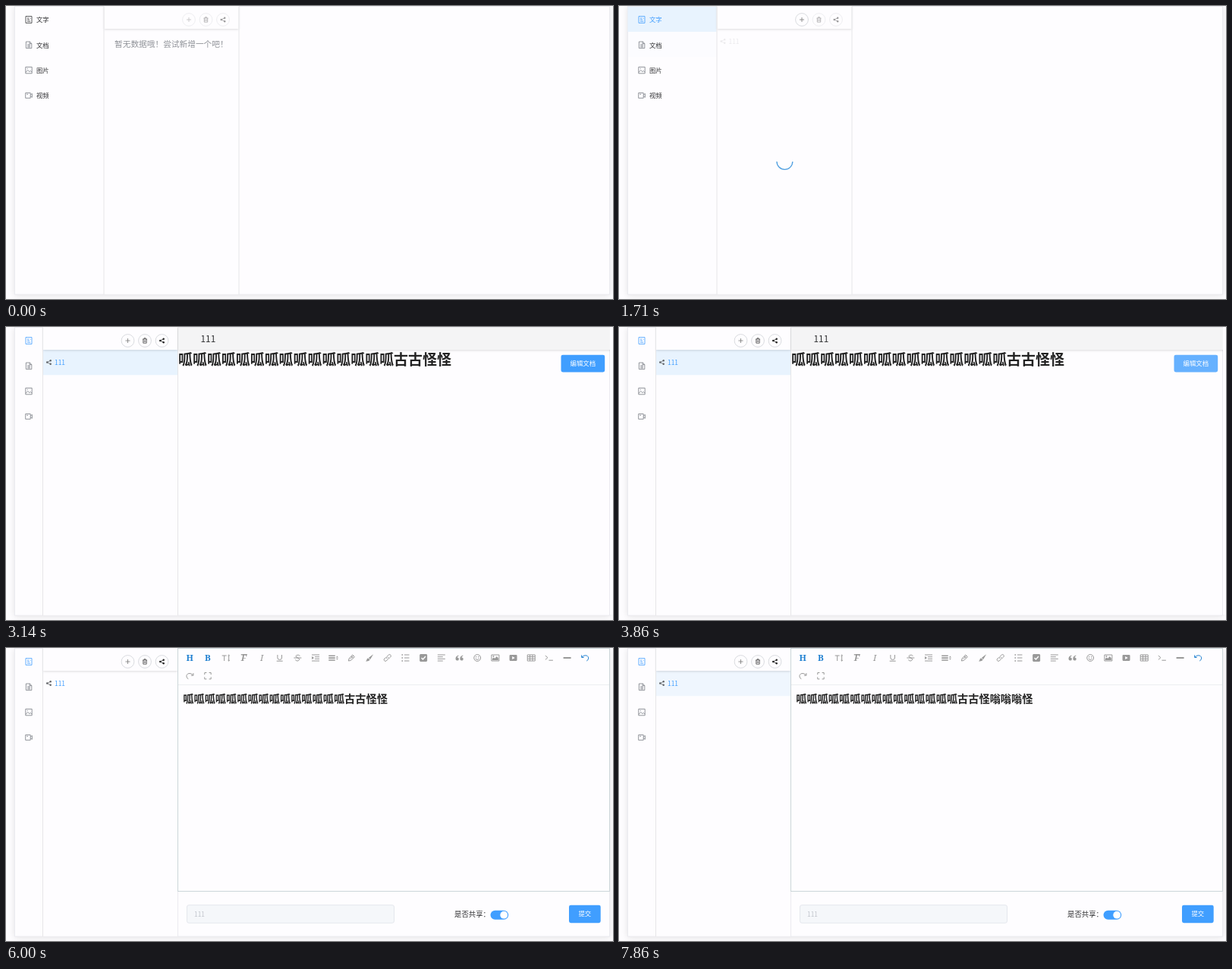
An HTML page for the animation above (8000 ms loop, 800 by 386 pixels).

```html
<!DOCTYPE html>
<html lang="zh">
<head>
<meta charset="utf-8">
<style>
html, body { margin: 0; width: 100%; height: 100%; overflow: hidden; background: #fefdff; }
svg { display: block; font-family: "Noto Sans CJK SC", "Noto Sans CJK", "Noto Sans", sans-serif; font-size: 8.4px; }
text { fill: currentColor; white-space: pre; }
path { fill: none; stroke: currentColor; stroke-width: 1; }
path.f { fill: currentColor; stroke: none; }
.thin path { stroke-width: .8; }
.line { stroke: #e6e6e8; }
.serif { font: bold 11.5px "Noto Serif", serif; text-anchor: middle; }
.mid { text-anchor: middle; }
.tools { color: #999; }
.on { color: #1e7fd0; }
.big { font-weight: bold; color: #222; }
.row { fill: #e8f3fe; }
</style>
</head>
<body>
<svg id="stage" width="800" height="386" viewBox="0 0 800 386"></svg>
<script>
const LOOP = 8000;
const BG = '#fefdff', BLUE = '#409eff';
const at = (x, y, body, attrs = '') => `<g transform="translate(${x} ${y})" ${attrs}>${body}</g>`;
const line = d => `<path d="${d}"/>`;
const solid = d => `<path class="f" d="${d}"/>`;
const glyph = (s, style = '') => `<text class="serif" y="4" style="${style}">${s}</text>`;
const rect = (x, y, w, h, attrs) => `<rect x="${x}" y="${y}" width="${w}" height="${h}" ${attrs}/>`;
const dot = (x, y, r) => `<circle cx="${x}" cy="${y}" r="${r}" fill="currentColor"/>`;
const label = (x, y, s, attrs = '') => `<text x="${x}" y="${y}" ${attrs}>${s}</text>`;

const share = line('M2.2-2.3L-2.3 0L2.2 2.3') + dot(2.2, -2.3, 1.2) + dot(-2.3, 0, 1.2) + dot(2.2, 2.3, 1.2);
const plus = line('M-3 0H3M0-3V3');
const trash = line('M-3-2H3M-1-2V-3.3H1V-2M-2.2-2V3.2H2.2V-2M-.8-.5V1.8M.8-.5V1.8');

const page = 'M-3.6-4.3H1.4L3.8-1.9V4.3H-3.6Z';
const menu = [
  ['文字', line('M-4-4.4H4V4.4H-4ZM-2-2H0M-2 0H1M-2 2.2H2.2M1.4-2.4L2.4-1.4')],
  ['文档', line(page + 'M1.2-4.3V-1.7H3.8M-1.8-.6H2M-1.8 1.1H2M-1.8 2.7H2')],
  ['图片', line('M-4.2-4.2H4.2V4.2H-4.2ZM-4 2.6L-1.2 0L1 2L2.4 .8L4 2.4M-2.2-2.2H-1.2')],
  ['视频', line('M-4.3-3.4H2.2V3.4H-4.3ZM2.2-1L4.4-2.4V2.4L2.2 1M-2.8-1.6H-.8')]
];

const bars = line('M-1.5-4H5M-1.5 0H5M-1.5 4H5');
const tools = [
  glyph('H'), glyph('B', 'font-family:"Noto Sans",sans-serif'),
  line('M-5-3H1M-2-3V4M4-3.5V4M2.8-2.8L4-4L5.2-2.8M2.8 3L4 4.2L5.2 3'),
  glyph('F', 'font-style:italic') + line('M-3-3.5Q-4-5-2-4.5H4.5'),
  glyph('I', 'font-style:italic;font-weight:400'),
  line('M-2.8-4V0Q-2.8 2.4 0 2.4T2.8 0V-4M-4 4.2H4'),
  line('M3-2.6Q1.5-4.4-1-3.6T-1.6-.8L1.6 .8Q3.2 2.2 1.2 3.6T-3 2.6M-5 0H5'),
  line('M-5-4H5M-1-1.3H5M-1 1.3H5M-5 4H5') + solid('M-5-2L-2 0L-5 2Z'),
  `<g stroke-width="2">${solid('M-6.5-3.6H2V-2H-6.5ZM-6.5-.7H2V.9H-6.5ZM-6.5 2.2H2V3.8H-6.5ZM3.2-.6L4.7-2.4L6.2-.6ZM3.2 .8L4.7 2.6L6.2 .8Z')}</g>`,
  line('M-4 4L-3.4 1L1.2-4L4-1.4L-1 3.4ZM-1.8 1.6L2.4-2.8M-.4-2.2L2.4 .4'),
  solid('M5-4.8L1 2L-1.2 0ZM-1.8 .4L.6 2.6Q-1 5-5 4.4Q-3.4 3-3.4 1.6Q-3 .4-1.8 .4Z'),
  line('M-.8 1Q-2-.4-.8-1.6L1.6-4Q3-5 4.2-3.6T3.8-1L2.2 .6M.8-1Q2 .4 .8 1.6L-1.6 4Q-3 5-4.2 3.6T-3.8 1L-2.2-.6'),
  bars + solid('M-5-4.7H-3.3V-3.2H-5ZM-5-.7H-3.3V.8H-5ZM-5 3.2H-3.3V4.7H-5Z'),
  solid('M-4-5H4L5-4V4L4 5H-4L-5 4V-4Z') + '<path d="M-2.6 0L-.7 2L2.8-2" style="stroke:#fff;stroke-width:1.4"/>',
  line('M-5-4H5M-5-1.3H2M-5 1.3H5M-5 4H2'),
  solid('M-1-3.6Q-5-2.6-5 1.2Q-5 3.6-2.8 3.6T-.6 1.4T-2.8-.6Q-2.6-2-1-2.6ZM4.8-3.6Q.8-2.6 .8 1.2Q.8 3.6 3 3.6T5.2 1.4T3-.6Q3.2-2 4.8-2.6Z'),
  '<circle r="4.4" fill="none" stroke="currentColor"/>' + dot(-1.6, -1.2, .8) + dot(1.6, -1.2, .8) + line('M-2.5 1Q0 4 2.5 1'),
  line('M-5-4H5V4H-5Z') + solid('M-4 3V1L-2-.6L-.6 .8L2-2L4 .4V3Z') + dot(-2.4, -2, .9),
  solid('M-4-4H4Q5-4 5-2.6V2.6Q5 4 4 4H-4Q-5 4-5 2.6V-2.6Q-5-4-4-4ZM-1.4-2V2L2.2 0Z'),
  line('M-5-4H5V4H-5ZM-5-1.4H5M-5 1.3H5M-1.7-4V4M1.7-4V4'),
  line('M-5-3L-2-.3L-5 2.4M-.5 3.2H5'),
  solid('M-5-1H5V1H-5Z'),
  line('M-4.6-3.6V-.6H-1.6M-4.4-.8Q-1.8-3.8 1.4-3.2Q5-2 4.2 1.4Q3.6 3.4 2 4'),
  line('M4.6-3.6V-.6H1.6M4.4-.8Q1.8-3.8-1.4-3.2Q-5-2-4.2 1.4Q-3.6 3.4-2 4'),
  line('M-4.2-1.6V-4.2H-1.6M1.6-4.2H4.2V-1.6M4.2 1.6V4.2H1.6M-1.6 4.2H-4.2V1.6')
];

const circleButton = (i, icon, color) => at(112 + 22.5 * i, 18,
  `<circle r="8.4" fill="${BG}" stroke="#d5d7dc" stroke-width=".9"/>` + icon, `class="thin" id="act${i}" color="${color}"`);
const button = (x, y, w, h, s, id) => `<g id="${id}" color="#fff">` +
  rect(x, y, w, h, `rx="2.4" fill="${BLUE}"`) + label(x + w / 2, y + h / 2 + 3, s, 'class="mid"') + '</g>';
const header = (w, fill) => rect(.5, .5, w, 29.5, `fill="${fill}" style="filter:drop-shadow(0 1px 1.5px #0002)"`);
const intro = '呱'.repeat(15) + '古古怪';

stage.innerHTML =
  rect(11.5, .5, 784, 379.5, `fill="${BG}" stroke="#ebebf0" style="filter:drop-shadow(0 1px 4px #0000001c)"`) +
  menu.map(([name, icon], i) => {
    const y = 18 + 33.3 * i;
    return rect(11.5, y - 17, 117, 33, `class="row" id="row${i}"`) +
      `<g id="menu${i}" color="#303133">` + at(30, y, icon, `class="thin" ${i ? 'color="#777b82"' : ''}`) +
      label(40, y + 3.2, name, 'class="name"') + '</g>';
  }).join('') +
  `<g id="list">` +
    rect(0, 0, 178, 379.5, `fill="${BG}"`) +
    rect(.5, 30, 177, 33.3, 'class="row" id="itemRow"') +
    `<g id="item" color="#606266">` + at(8, 46.5, share, 'class="thin" color="#606266"') + label(15.5, 49.7, '111') + '</g>' +
    label(14, 54, '暂无数据哦！尝试新增一个吧！', 'id="empty" font-size="10.7" color="#909399"') +
    rect(.5, 31, 177, 348, `id="mask" fill="${BG}"`) +
    `<path id="spinner" d="M10.4 0A10.4 10.4 0 0 1-10.4 0A10.4 10.4 0 0 1 10.4 0" pathLength="100" style="stroke:#4f9fe0;stroke-width:1.3"/>` +
    header(177, BG) + circleButton(0, plus, '#777') + circleButton(1, trash, '#444') + circleButton(2, share, '#222') +
    '<path class="line" style="stroke:#e6e6e8" d="M0 .5V380M178 .5V380"/>' +
  '</g>' +
  `<g id="view"><g id="doc">` + header(600, '#f4f4f5') + label(30, 20.3, '111', 'font-size="11.9" color="#303133"') +
    label(.5, 49.6, intro + '怪', 'class="big" font-size="18.95"') + '</g>' +
    rect(796, 0, 4, 379, `fill="${BG}"`) + button(731.5, 36.7, 57.7, 22.8, '编辑文档', 'edit') + '</g>' +
  `<g id="editor">` +
    rect(226.5, .5, 569, 379.5, `fill="${BG}" stroke="#ebebf0"`) +
    rect(226.5, .5, 569, 320, 'fill="none" stroke="#ccd6d9"') + '<path d="M227 48.5H795" style="stroke:#eceef0"/>' +
    tools.map((icon, i) => at(242.3 + 23.68 * (i % 23), i < 23 ? 13 : 36.7, icon, `class="tools" id="tool${i}"`)).join('') +
    label(233.3, 71.8, '', 'id="copy" class="big" font-size="14.2"') +
    '<path id="caret" d="M0 57V76" style="stroke:#222"/>' +
    rect(238.5, 338.7, 273, 23.5, 'rx="2.4" fill="#f5f7fa" stroke="#e4e7ed"') + label(248, 353.6, '111', 'color="#c0c4cc"') +
    label(591, 354.4, '是否共享：', 'font-size="9.4" color="#303133"') +
    rect(638.5, 345.7, 23.7, 12, `rx="6" fill="${BLUE}"`) + '<circle cx="656.2" cy="351.7" r="4.9" fill="#fff"/>' +
    button(742, 338.7, 41.7, 23.5, '提交', 'submit') +
    `<g id="ime">` + rect(490.5, 78.5, 309, 25, 'fill="#fff" stroke="#ccd6e0"') +
      label(495, 88, '', 'id="pinyin" font-size="7.5" color="#333"') + label(495, 100, '', 'id="choices" color="#1e7fd0"') + '</g>' +
  '</g>';

const $ = id => document.getElementById(id);
const ramp = (t, a, b) => Math.min(1, Math.max(0, (t - a) / (b - a)));
const ease = p => p * p * (3 - 2 * p);
const fade = (id, v) => $(id).setAttribute('opacity', v);
const tint = (id, color) => $(id).setAttribute('color', color);
const move = (id, x, y, rest = '') => $(id).setAttribute('transform', `translate(${x} ${y}) ${rest}`);
const names = document.querySelectorAll('.name');

function draw(t) {
  // sidebar
  const x = 129 - 80.5 * ease(ramp(t, 2370, 2670));
  fade('row0', ramp(t, 1290, 1480) - ramp(t, 2200, 2500));
  fade('row1', .8 * (ramp(t, 650, 850) - ramp(t, 1380, 1760)));
  fade('row2', .8 * (ramp(t, 320, 480) - ramp(t, 600, 850)));
  fade('row3', 0);
  tint('menu0', t < 1280 ? '#303133' : BLUE);
  names.forEach(n => n.setAttribute('opacity', 1 - ramp(t, 2440, 2640)));

  // list column
  move('list', x, 0);
  fade('empty', +(t < 1400));
  fade('item', +(t >= 1400));
  tint('item', t < 2640 ? '#606266' : BLUE);
  fade('itemRow', ramp(t, 2000, 2200) - ramp(t, 4150, 4285) + .8 * ramp(t, 7700, 7900));
  const load = ramp(t, 1180, 1330) - ramp(t, 1850, 2050);
  fade('mask', .88 * load);
  fade('spinner', load);
  move('spinner', 89.4, 205, `rotate(${(t - 1710) * .18})`);
  const sweep = ramp(t, 1230, 1980);
  $('spinner').setAttribute('stroke-dasharray', `${71 * ease(sweep)} 100`);
  const ready = ramp(t, 2050, 2300);
  fade('act0', .45 + .55 * ramp(t, 1380, 1550));
  fade('act1', .45 + .55 * ready);
  fade('act2', .45 + .55 * ready);

  // document view
  fade('view', +(t >= 2200 && t < 4290));
  move('doc', x + 178, 0);
  fade('edit', .2 * ramp(t, 2250, 2400) + .8 * ramp(t, 2430, 2760));
  $('edit').firstChild.setAttribute('fill', t > 3280 ? '#66b1ff' : BLUE);

  // editor
  fade('editor', +(t >= 4290));
  const typed = t >= 7280;
  $('copy').textContent = intro + (typed ? '嗡嗡嗡' : '') + '怪';
  const caretX = t < 5860 ? 503.5 : typed ? 531.5 : 489.5;
  move('caret', caretX, 0);
  fade('caret', +(t < 4710 || t >= 5290 && t < 5860 || t >= 6570 && t < 7710));
  for (const i of [0, 1, 22]) $('tool' + i).classList.toggle('on', t >= 5500);
  fade('ime', +(t >= 6570 && !typed));
  const count = 1 + Math.floor(14 * ramp(t, 6570, 7150));
  $('pinyin').textContent = "weng'weng'weng".slice(0, count);
  const word = '嗡翁瓮'.split('').map(c => c.repeat(Math.ceil(count / 5)));
  $('choices').textContent = word.map((w, i) => `${i + 1}.${w}`).join('   ');
}

const start = performance.now();
(function tick() {
  draw((performance.now() - start) % LOOP);
  requestAnimationFrame(tick);
})();
</script>
</body>
</html>
```
